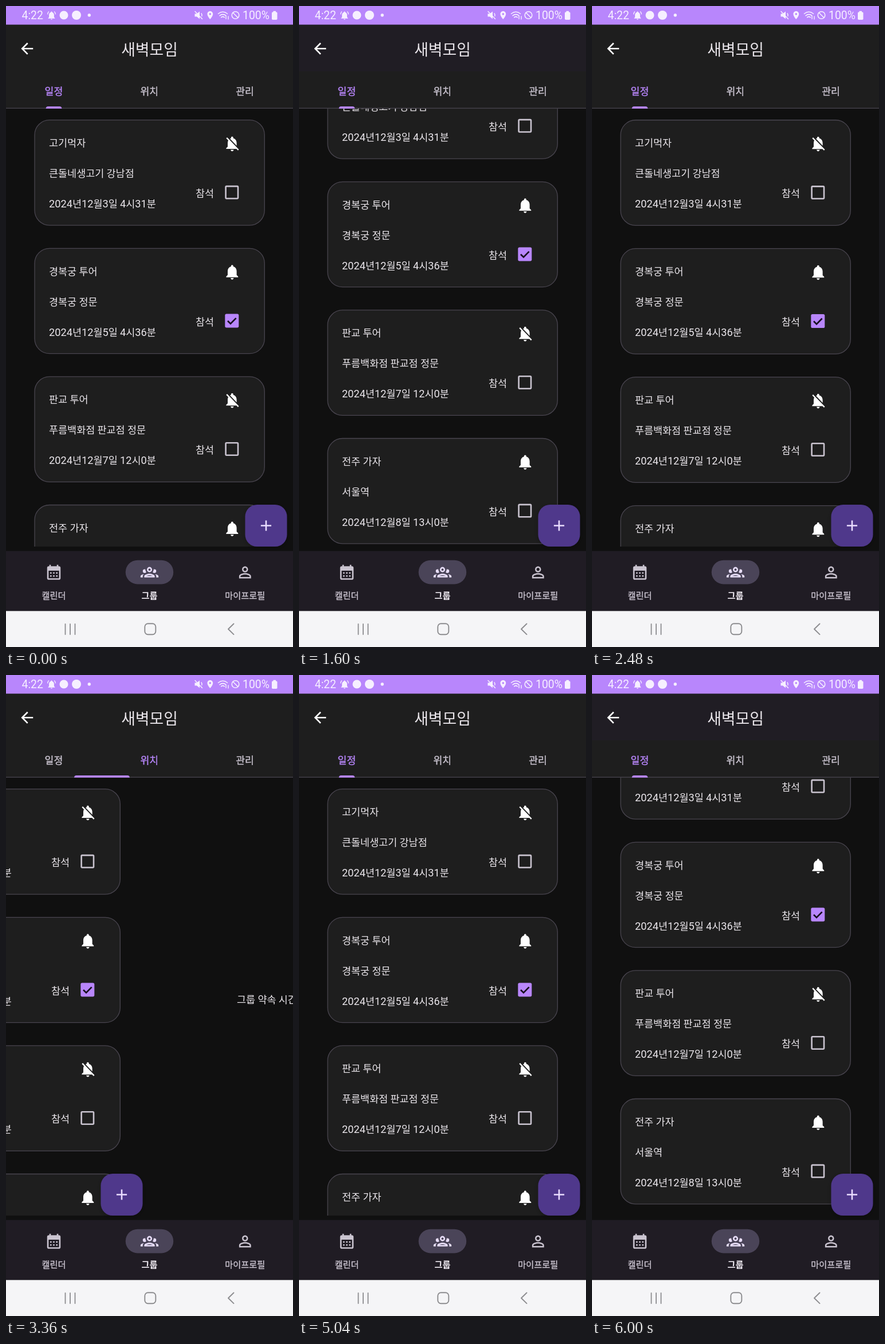
These frames come from a looping animation (501x1117 px, 6.4 s). An HTML page:

```html
<!DOCTYPE html>
<html lang="ko">
<head>
<meta charset="utf-8">
<style>
html, body { margin: 0; width: 100%; height: 100%; overflow: hidden; background: #101010; }
svg { display: block; width: 501px; height: 1117px; }
text { font-family: Roboto, "Noto Sans CJK KR", "Noto Sans CJK", sans-serif; font-size: 17.45px; fill: #ebe7ec; }
.num { font-size: 18.2px; }
.mid { text-anchor: middle; }
.title { font-size: 26.8px; }
.tab, .nav { font-weight: 500; color: #cac4d0; fill: currentColor; stroke: currentColor; stroke-width: .35px; }
.tab { font-size: 17.2px; }
.nav { font-size: 15.2px; }
.nav.on { font-weight: 700; color: #f2edf5; stroke: none; }
.status { font-size: 19.4px; fill: #f6efff; }
.line { fill: none; stroke-linejoin: round; stroke-linecap: round; }
</style>
</head>
<body>
<svg id="stage" viewBox="0 0 501 1117"></svg>
<script>
const W = 501, LOOP = 6400, STEP = 80;
const ACCENT = '#b886fc', MUTED = '#cac4d0', OUTLINE = '#49454f';
const VIEW_TOP = 178;

const ICONS = {
  bell: 'M12 22c1.1 0 2-.9 2-2h-4c0 1.1.89 2 2 2zm6-6v-5c0-3.07-1.64-5.64-4.5-6.32V4c0-.83-.67-1.5-1.5-1.5s-1.5.67-1.5 1.5v.68C7.63 5.36 6 7.92 6 11v5l-2 2v1h16v-1l-2-2z',
  bellOff: 'M20 18.69L7.84 6.14 5.27 3.49 4 4.76l2.8 2.8v.01c-.52.99-.8 2.16-.8 3.42v5l-2 2v1h13.73l2 2L21 19.72l-1-1.03zM12 22c1.11 0 2-.89 2-2h-4c0 1.11.89 2 2 2zm6-7.32V11c0-3.08-1.64-5.64-4.5-6.32V4c0-.83-.67-1.5-1.5-1.5s-1.5.67-1.5 1.5v.68c-.5.1-1 .3-1.44.56L18 14.68z',
  back: 'M20 11H7.83l5.59-5.59L12 4l-8 8 8 8 1.41-1.41L7.83 13H20v-2z',
  calendar: 'M19 4h-1V2h-2v2H8V2H6v2H5c-1.1 0-2 .9-2 2v14c0 1.1.9 2 2 2h14c1.1 0 2-.9 2-2V6c0-1.1-.9-2-2-2zm0 16H5V10h14v10zM9 14H7v-2h2v2zm4 0h-2v-2h2v2zm4 0h-2v-2h2v2zm-8 4H7v-2h2v2zm4 0h-2v-2h2v2zm4 0h-2v-2h2v2z',
  group: 'M12 5a3.5 3.5 0 0 0 0 7a3.5 3.5 0 0 0 0-7zm0 2a1.5 1.5 0 0 1 0 3a1.5 1.5 0 0 1 0-3zM5.5 8a2.5 2.5 0 0 0 0 5c.9 0 1.650-.45 2.120-1.190A5.400 5.400 0 0 1 6.500 8.220C6.200 8.080 5.860 8 5.500 8zM18.500 8a2.500 2.500 0 0 1 0 5c-.9 0-1.650-.45-2.120-1.190A5.400 5.400 0 0 0 17.500 8.220C17.800 8.080 18.140 8 18.500 8zM12 14c-2.340 0-7 1.170-7 3.500V19h14v-1.500c0-2.330-4.660-3.500-7-3.500zm0 2c1.530 0 3.240.5 4.230 1H7.770c.99-.5 2.700-1 4.230-1zM4.710 14.550C2.780 14.780 0 15.760 0 17.500V19h3v-1.930c0-1.010.69-1.850 1.710-2.520zM19.290 14.550c1.020.67 1.710 1.510 1.710 2.520V19h3v-1.500c0-1.740-2.780-2.720-4.710-2.950z',
  person: 'M12 5.9c1.16 0 2.1.94 2.1 2.1s-.94 2.1-2.1 2.1S9.9 9.16 9.9 8s.94-2.1 2.1-2.1m0 9c2.97 0 6.1 1.46 6.1 2.1v1.1H5.9V17c0-.64 3.13-2.1 6.1-2.1M12 4C9.79 4 8 5.79 8 8s1.79 4 4 4 4-1.79 4-4-1.79-4-4-4zm0 9c-2.67 0-8 1.34-8 4v3h16v-3c0-2.66-5.33-4-8-4z',
  pin: 'M12 2C8.13 2 5 5.13 5 9c0 5.25 7 13 7 13s7-7.75 7-13c0-3.87-3.13-7-7-7zm0 9.5c-1.38 0-2.5-1.12-2.5-2.5s1.12-2.5 2.5-2.5 2.5 1.12 2.5 2.5-1.12 2.5-2.5 2.5z'
};

const icon = (name, cx, cy, fill, s = 1.304) =>
  `<path d="${ICONS[name]}" fill="${fill}" fill-rule="evenodd" transform="translate(${cx - 12 * s} ${cy - 12 * s}) scale(${s})"/>`;
const rect = (x, y, w, h, fill, rest = '') =>
  `<rect x="${x}" y="${y}" width="${w}" height="${h}" fill="${fill}" ${rest}/>`;
const text = (x, y, cls, str, rest = '') => `<text x="${x}" y="${y}" class="${cls}" ${rest}>${str}</text>`;
const line = (d, stroke, w) => `<path class="line" d="${d}" stroke="${stroke}" stroke-width="${w}"/>`;
const digits = str => str.replace(/\d+/g, '<tspan class="num">$&</tspan>');

const events = [
  ['고기먹자', '큰돌네생고기 강남점', '2024년12월3일 4시31분', false, false],
  ['경복궁 투어', '경복궁 정문', '2024년12월5일 4시36분', true, true],
  ['판교 투어', '푸름백화점 판교점 정문', '2024년12월7일 12시0분', false, false],
  ['전주 가자', '서울역', '2024년12월8일 13시0분', true, false]
];

function checkbox(on) {
  return on
    ? rect(382.3, 114.3, 24, 24, ACCENT, 'rx="2.6"') +
      '<path d="M387 126.6l5 5 9.6-9.8" fill="none" stroke="#17101f" stroke-width="2.7"/>'
    : rect(383.6, 115.6, 21.4, 21.4, 'none', `rx="1.4" stroke="${MUTED}" stroke-width="2.6"`);
}

function card([name, place, date, alarm, going], i) {
  return `<g transform="translate(0 ${198.5 + i * 223.6})">` +
    rect(50, .2, 401.3, 183.4, '#1e1e1e', `rx="26" stroke="${OUTLINE}" stroke-width="1.3"`) +
    text(75, 46.8, '', name) + text(75, 99.8, '', place) + text(75, 152.6, '', digits(date)) +
    text(331, 134.5, '', '참석') +
    icon(alarm ? 'bell' : 'bellOff', 394.8, 41.5, '#fff') + checkbox(going) + '</g>';
}

function statusBar() {
  const c = '#f6efff';
  return rect(0, 0, W, 32.5, ACCENT) + text(27.5, 22.7, 'status', '4:22') +
    icon('bell', 79.5, 16.5, c, .74) + line('M74.5 10q-1.6 1.5-1.8 4M84.500 10q1.600 1.500 1.800 4', c, 1.4) +
    [[101, 7.5], [123, 8], [145.3, 2.7]].map(([x, r]) => `<circle cx="${x}" cy="16" r="${r}" fill="${c}"/>`).join('') +
    `<path d="M329.5 13.5h3.5l5-4v13l-5-4h-3.5z" fill="${c}"/>` + line('M330 9.5l12.5 13M341 13q1.6 2 .8 4.5', c, 1.5) +
    icon('pin', 356.3, 16, c, .7) +
    line('M370.5 13.5q8-6.5 16 0M373 16.8q5.5-4.5 11 0M375.7 19.8q2.8-2.3 5.6 0', c, 1.6) +
    line('M384 22.5v-5M388 18v5', c, 1.4) +
    `<circle cx="400.5" cy="16" r="6.3" fill="none" stroke="${c}" stroke-width="1.6"/>` + line('M396.2 11.7l8.6 8.6', c, 1.6) +
    text(413, 22.7, 'status', '100%') +
    rect(464, 10.5, 9.5, 13.5, c, 'rx="1.8"') + rect(466.5, 8.8, 4.5, 3, c);
}

function bottomNav() {
  const sys = '#8c8c8f';
  return rect(0, 949.7, W, 105, '#201c24') +
    rect(208.7, 965.7, 83.5, 41.7, '#4a4458', 'rx="20.85"') +
    icon('calendar', 83.5, 986.7, MUTED) + icon('group', 250.5, 986.7, '#e8def8') + icon('person', 417.3, 987, MUTED) +
    text(83.5, 1033, 'nav mid', '캘린더') +
    text(250.5, 1033, 'nav mid on', '그룹') +
    text(417.3, 1033, 'nav mid', '마이프로필') +
    rect(0, 1054.3, W, 63, '#f5f5f7') +
    line('M103.5 1077v18M112 1077v18M120.5 1077v18', sys, 1.8) +
    rect(242.3, 1076.3, 19, 19, 'none', `rx="5.5" stroke="${sys}" stroke-width="1.9"`) +
    line('M397.5 1076.5l-9.5 9.3 9.5 9.3', sys, 1.9);
}

const fab = rect(417.5, 869, 73, 73, '#4f378b', 'rx="20.8" filter="url(#shadow)"') +
  '<path d="M444.9 905.5h18.2M454 896.4v18.2" stroke="#eaddff" stroke-width="2.6"/>';

const $ = id => document.getElementById(id);
$('stage').innerHTML = `<defs>
  <clipPath id="view">${rect(0, VIEW_TOP, W, 764, '#000')}</clipPath>
  <filter id="shadow" x="-30%" y="-30%" width="160%" height="160%">
    <feDropShadow dx="0" dy="2" stdDeviation="4" flood-color="#000" flood-opacity=".25"/></filter></defs>` +
  rect(0, 0, W, 1117, '#101010') +
  `<g clip-path="url(#view)"><g id="pager"><g id="list">${events.map(card).join('')}</g></g></g>
  <g id="overlay">${fab}${text(W + 154, 572, '', '그룹 약속 시간에 표시됩니다')}</g>` +
  rect(0, 32, W, 146.5, '#1e1e1e') + rect(0, 32, W, 82, '#1e1e1e', 'id="bar"') +
  rect(0, 177.5, W, 1.3, OUTLINE) + icon('back', 36.8, 74.3, '#fff') +
  text(250.5, 86, 'mid title', '새벽모임') +
  ['일정', '위치', '관리'].map((s, i) => text(83.4 + 166.8 * i, 154.8, 'tab mid', s, `id="tab${i}"`)).join('') +
  `<path id="marker" fill="${ACCENT}"/>` + bottomNav() + statusBar();

// Tracks of [time, value], linear between points.
const fling = [17, 44, 75, 100, 116, 126, 130, 131];
const scrollTrack = [
  [1200, 0], ...fling.map((v, i) => [1280 + i * STEP, v]),
  [1920, 131], [2000, 117], [2080, 87], [2160, 54], [2240, 27], [2320, 9], [2400, 0], [2480, -1], [2640, 0],
  [5280, 0], [5360, 17], [5440, 17], ...fling.slice(1).map((v, i) => [5520 + i * STEP, v])
];
const panTrack = [
  [3040, 0], [3120, 22], [3200, 84], [3360, 252], [3440, 380], [3520, 455], [3600, 490], [3680, W],
  [4560, W], [4640, 470], [4720, 380], [4800, 240], [4880, 105], [4960, 25], [5040, 0]
];

function sample(track, t) {
  const i = track.findIndex(p => p[0] > t);
  if (i === 0) return track[0][1];
  if (i < 0) return track[track.length - 1][1];
  const [t0, a] = track[i - 1], [t1, b] = track[i];
  return a + (b - a) * (t - t0) / (t1 - t0);
}

// Scrolling past the top stretches the list instead of moving it.
function listTransform(scroll) {
  if (scroll >= 0) return `translate(0 ${-scroll})`;
  const s = 1 - scroll * .0017;
  return `translate(0 ${VIEW_TOP * (1 - s)}) scale(1 ${s})`;
}

function draw(ms) {
  const t = Math.floor(ms % LOOP / STEP) * STEP;
  const scroll = sample(scrollTrack, t), pan = sample(panTrack, t), f = pan / W;
  $('list').setAttribute('transform', listTransform(scroll));
  $('pager').setAttribute('transform', `translate(${-pan} 0)`);
  $('overlay').setAttribute('transform', `translate(${-pan} 0)`);
  $('bar').setAttribute('fill', scroll > 60 ? '#201d24' : '#1e1e1e');
  // Elastic marker: the leading edge runs ahead of the trailing one.
  const left = 69.7 + 166.8 * (1 - Math.cos(f * Math.PI / 2));
  const right = 97.3 + 166.8 * Math.sin(f * Math.PI / 2);
  $('marker').setAttribute('d', `M${left} 178.8v-.3q0-3.6 3.6-3.6H${right - 3.6}q3.6 0 3.6 3.6v.3z`);
  const selected = f > .5 ? 1 : 0;
  for (let i = 0; i < 3; i++) $('tab' + i).style.color = i === selected ? ACCENT : MUTED;
}

const start = performance.now();
function tick() {
  draw(performance.now() - start);
  requestAnimationFrame(tick);
}
tick();
</script>
</body>
</html>
```
